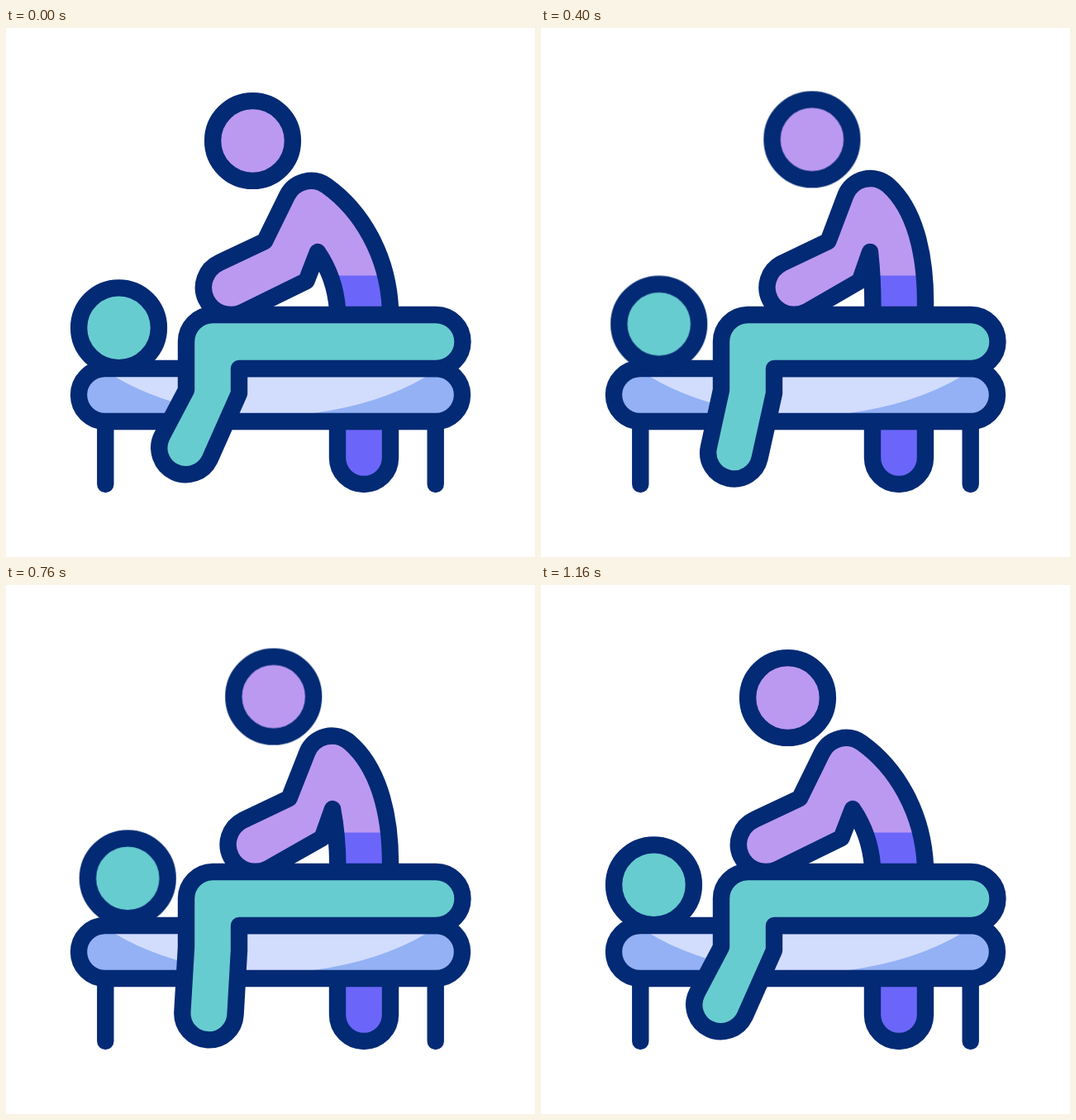
These frames come from a looping animation (640 by 640 pixels, 1.2 s). An HTML page:

```html
<!DOCTYPE html>
<html lang="en">
<head>
<meta charset="utf-8">
<title>Massage</title>
<style>
  html, body { margin: 0; width: 100%; height: 100%; overflow: hidden; background: #fff; }
  svg { display: block; width: 100vw; height: 100vh; }

  .line { stroke: #032a74; stroke-width: 20.4; stroke-linejoin: round; }
  .none { fill: none; }
  .purple { fill: #bb99f1; }
  .violet { fill: #6b66f9; }
  .teal { fill: #67ccd0; }
  .pale { fill: #d2dcfd; }
  .blue { fill: #93b1f4; }

  .torso, .head, .patient, .rest { animation: 1200ms ease-in-out infinite; }
  .torso { animation-name: torso; }
  .head { animation-name: head; }
  .patient { animation-name: patient; }
  .rest { animation-name: rest; }

  /* The therapist leans back first; the patient follows. */
  @keyframes torso {
    0%, 3.33%, 86.67%, 100% {
      d: path("M465 345 L465 340 C462 275 430 221 388 191 A32.4 32.4 0 0 0 340 203 L313 258 L258 284 A30 30 0 0 0 286 344 L363.5 306 L377 271 C390 290 399 315 401 340 L401 345");
    }
    45%, 50% {
      d: path("M465 345 L465 340 C467 270 455 217 426 190 A32.4 32.4 0 0 0 374 202 L354 258 L297.5 285 A30 30 0 0 0 328.5 343 L390 306 L402 271 C402 290 402 315 401.5 340 L401.5 345");
    }
  }
  @keyframes head {
    0%, 3.33%, 86.67%, 100% { transform: translate(0, 0); }
    45%, 50% { transform: translate(35px, -2px); }
  }
  @keyframes patient {
    0%, 13.33%, 93.5%, 100% {
      d: path("M250 347 L520 347 A32.5 32.5 0 0 1 520 412 L282 412 L282 442 L246.5 522 A30 30 0 0 1 188.5 494 L218 438 L218 380 A32.5 32.5 0 0 1 250 347 Z");
    }
    51.67%, 56.67% {
      d: path("M250 347 L520 347 A32.5 32.5 0 0 1 520 412 L282 412 L282 442 L279.8 520 A30 30 0 0 1 215.2 518 L218 438 L218 380 A32.5 32.5 0 0 1 250 347 Z");
    }
  }
  @keyframes rest {
    0%, 13.33%, 93.5%, 100% { transform: translate(0, 0); }
    51.67%, 56.67% { transform: translate(11.5px, -8.5px); }
  }
</style>
</head>
<body>
<svg viewBox="0 0 640 640">
  <!-- therapist -->
  <path class="line violet" d="M401 470 V520 A32 32 0 0 0 465 520 V470"/>
  <path class="torso purple"/>
  <rect class="violet" x="398" y="299.5" width="64" height="45.5"/>
  <path class="torso line none"/>
  <circle class="head line purple" cx="298.5" cy="136.5" r="48.4"/>

  <!-- table -->
  <path class="line" stroke-linecap="round" d="M120.3 476 V552 M519.7 476 V552"/>
  <rect class="blue" x="88" y="412" width="464" height="64" rx="32"/>
  <path class="pale" d="M115 412 L132 422 Q180 451 257 466 V476 H372 V466 Q452 455 508 422 L525 412 Z"/>
  <rect class="line none" x="88" y="412" width="464" height="64" rx="32"/>

  <!-- patient -->
  <circle class="rest line teal" cx="136.5" cy="362.8" r="48.4"/>
  <path class="patient line teal"/>
</svg>
</body>
</html>
```
